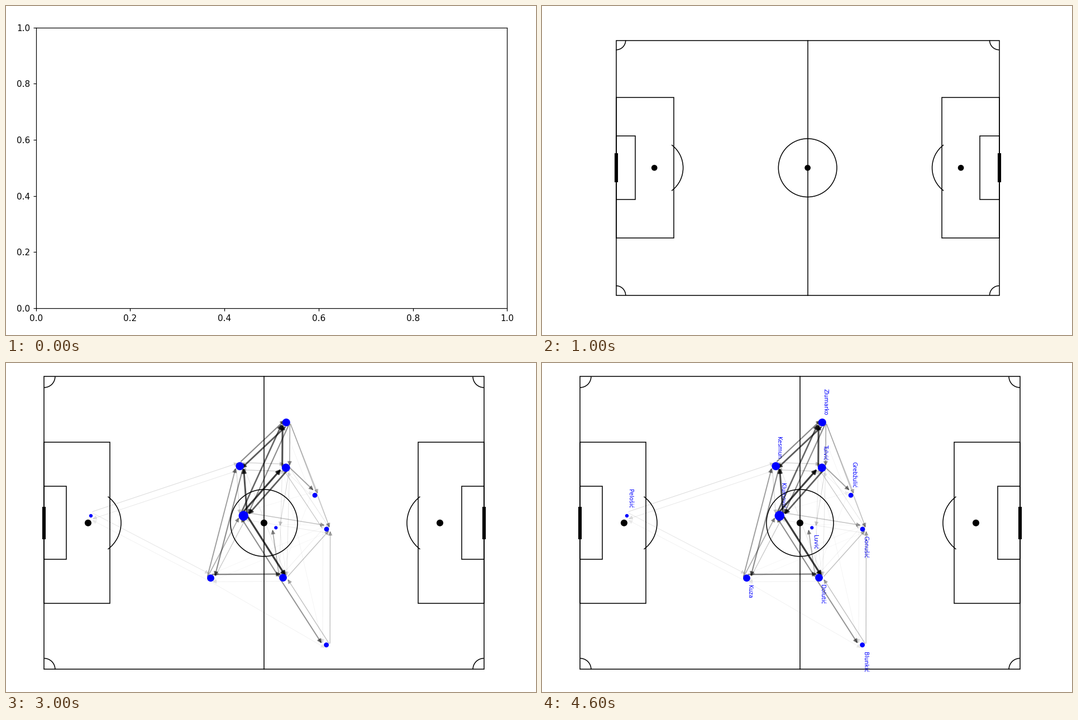
A matplotlib script that plays this animation: 949 px wide and 590 px high, repeating every 5000 ms.

```python
import matplotlib.pyplot as plt
from matplotlib.animation import FuncAnimation
from matplotlib.patches import Arc, Circle, FancyArrowPatch, Rectangle

W, H, DPI = 949, 590, 128
PX = 72 / DPI      # points per pixel
UNIT = 1.53        # pixels per design point
SHIFT = 6.56       # sideways offset between the two directions of a pair

plt.rcParams["font.family"] = "DejaVu Sans"
fig = plt.figure(figsize=(W / DPI, H / DPI), dpi=DPI, facecolor="white")

# key: x, y, radius, name, side of the label (-1 above, 1 below)
PLAYERS = {
    "A": (501.8, 106.6, 7.0, "Zlumarko", -1),
    "B": (418.7, 185.0, 7.3, "Kesmun", -1),
    "C": (501.2, 187.8, 7.4, "Tulvić", -1),
    "D": (553.0, 237.2, 4.4, "Grebžulić", -1),
    "G": (152.0, 274.0, 3.2, "Pelošić", -1),
    "E": (425.3, 274.0, 8.7, "Klumović", -1),
    "H": (483.3, 295.4, 3.1, "Luvić", 1),
    "I": (574.0, 298.0, 4.4, "Gonušić", 1),
    "J": (366.5, 385.7, 6.4, "Kuza", 1),
    "K": (496.0, 385.0, 6.9, "Dolutić", 1),
    "L": (573.6, 505.6, 4.4, "Blunkić", 1),
}

# passer, receiver and side of the offset -> weight
PASSES = {
    "DA-": .07, "ED-": .06, "JI-": .06, "IJ+": .05, "CL-": .07, "DK-": .06,
    "HI-": .06, "IL-": .09, "IK-": .09, "HK+": .09, "KJ+": .10, "JL+": .08,
    "DC+": .10, "DI+": .07, "IE+": .12, "GB-": .18, "BG+": .13, "GJ-": .14,
    "JG+": .08, "BK+": .14, "CK+": .14, "KC-": .14, "CH+": .20, "CI+": .14,
    "IC-": .28, "BC-": .25, "CB+": .26, "BE-": .22, "EJ+": .28, "EI-": .32,
    "AD+": .28, "AI+": .32, "KI+": .32, "LI+": .32, "LK+": .32, "AC+": .42,
    "KH-": .42, "CD-": .48, "JE-": .42, "JB-": .50, "KL-": .54, "AE+": .58,
    "KE-": .58, "BJ+": .58, "BA-": .60, "JK-": .64, "EA-": .78, "CE+": .82,
    "AB+": .84, "EB+": .90, "CA-": .92, "EC-": .98, "EK+": 1.0,
}


def stage():
    ax = fig.add_axes([0, 0, 1, 1])
    ax.set(xlim=(0, W), ylim=(H, 0))
    ax.axis("off")
    return ax


def empty_plot():
    left, right, top, bottom = 53.7, 897.3, 38.7, 542
    ax = fig.add_axes([left / W, 1 - bottom / H,
                       (right - left) / W, (bottom - top) / H])
    line = 0.8 * UNIT * PX
    ax.tick_params(labelsize=10 * UNIT * PX, length=3.5 * UNIT * PX,
                   width=line, pad=3.5 * UNIT * PX)
    for spine in ax.spines.values():
        spine.set_linewidth(line)


def draw_pitch(ax, x0, y0, s):
    """Pitch of 120 x 80 units, s pixels per unit."""
    lw = UNIT * PX

    def pos(x, y):
        return x0 + x * s, y0 + y * s

    def box(x, y, w, h):
        ax.add_patch(Rectangle(pos(x, y), w * s, h * s, fill=False, lw=lw))

    def arc(x, y, r, start, end):
        ax.add_patch(Arc(pos(x, y), 2 * r * s, 2 * r * s,
                         theta1=start, theta2=end, lw=lw))

    def line(x, ya, yb, width):
        (xa, top), (xb, bottom) = pos(x, ya), pos(x, yb)
        ax.plot([xa, xb], [top, bottom], color="black", lw=width,
                solid_capstyle="projecting")

    box(0, 0, 120, 80)
    line(60, 0, 80, lw)
    ax.add_patch(Circle(pos(60, 40), 9.15 * s, fill=False, lw=lw))
    for x in (0, 102):
        box(x, 18, 18, 44)
    for x in (0, 114):
        box(x, 30, 6, 20)
    for x in (12, 60, 108):
        ax.add_patch(Circle(pos(x, 40), 0.8 * s, color="black", lw=lw))
    arc(12, 40, 9, -53, 53)
    arc(108, 40, 9, 127, 233)
    for i, (x, y) in enumerate([(0, 0), (120, 0), (120, 80), (0, 80)]):
        arc(x, y, 3, 90 * i, 90 * i + 90)
    for x in (0, 120):
        line(x, 36, 44, 4 * lw)


def draw_players(ax):
    for x, y, r, *_ in PLAYERS.values():
        ax.add_patch(Circle((x, y), r, color="blue", lw=0, zorder=5))


def draw_passes(ax):
    for (a, b, side), weight in PASSES.items():
        xa, ya = PLAYERS[a][:2]
        xb, yb = PLAYERS[b][:2]
        shift = SHIFT if side == "+" else -SHIFT
        flat = abs(xb - xa) > abs(yb - ya)
        dx, dy = (0, shift) if flat else (shift, 0)
        ax.add_patch(FancyArrowPatch(
            (xa + dx, ya + dy), (xb + dx, yb + dy), arrowstyle="-|>",
            mutation_scale=10 * UNIT * PX, shrinkA=2 * UNIT * PX,
            shrinkB=2 * UNIT * PX, color="black", alpha=0.76 * weight,
            lw=(0.6 + 2.7 * weight) * PX, zorder=4))


def draw_names(ax):
    for x, y, _, name, side in PLAYERS.values():
        gap, va = (12.4, "top") if side > 0 else (-13.4, "bottom")
        ax.text(x + 0.8, y + gap, name, color="blue", rotation=270,
                size=6.5 * UNIT * PX, ha="left", va=va, zorder=3)


def update(step):
    fig.clear()
    if step == 0:
        empty_plot()
        return
    ax = stage()
    if step == 1:
        draw_pitch(ax, 132.6, 61.5, 5.717)
        return
    draw_pitch(ax, 68.2, 24.3, 6.5625)
    for layer in (draw_players, draw_passes, draw_names)[:step - 1]:
        layer(ax)


anim = FuncAnimation(fig, update, frames=5, init_func=lambda: update(0),
                     interval=1000, repeat=True, repeat_delay=0, blit=False)
plt.show()
```
